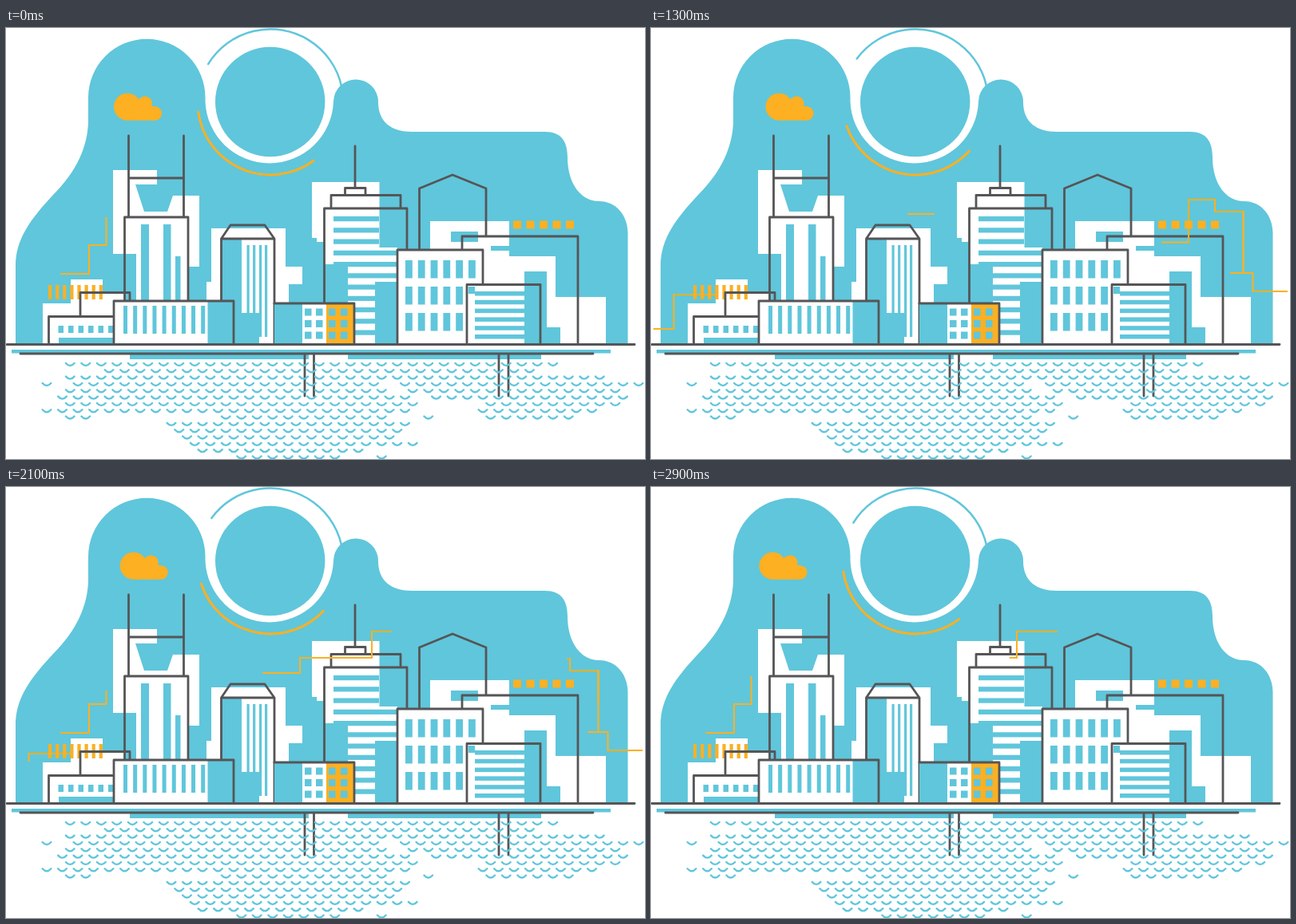
An HTML page with a canvas that plays this animation: 800x540 px, repeating every 3000 ms.

```html
<!DOCTYPE html>
<html lang="en">
<head>
<meta charset="utf-8">
<title>City skyline</title>
<style>
html, body { margin: 0; width: 800px; height: 540px; overflow: hidden; background: #fff; }
canvas { display: block; }
</style>
</head>
<body>
<canvas id="stage" width="800" height="540"></canvas>
<script>
const LOOP = 3000, STEP = 100;
const BLUE = '#60c6db', DARK = '#555557', ORANGE = '#fcb022', WHITE = '#fff';

const view = document.getElementById('stage').getContext('2d');
const backdrop = document.createElement('canvas');
backdrop.width = 800;
backdrop.height = 540;
const city = backdrop.getContext('2d');

const fill = (g, color, d) => { g.fillStyle = color; g.fill(new Path2D(d)); };
const rect = (color, x, y, right, bottom) => {
  city.fillStyle = color;
  city.fillRect(x, y, right - x, bottom - y);
};
const row = (color, count, x, pitch, width, y, bottom) => {
  for (let i = 0; i < count; i++) rect(color, x + i * pitch, y, x + i * pitch + width, bottom);
};
const line = d => {
  city.strokeStyle = DARK;
  city.lineWidth = 2.8;
  city.lineJoin = city.lineCap = 'round';
  city.stroke(new Path2D(d));
};
const disc = (g, color, x, y, r) => {
  g.fillStyle = color;
  g.beginPath();
  g.arc(x, y, r, 0, 2 * Math.PI);
  g.fill();
};

function drawSky() {
  fill(city, BLUE, `M12 396V298C12 265 30 240 60 208C88 180 103 148 103 115V87A73 73 0 0 1 249.5 87
    V92A80.3 80.3 0 0 0 410 92A28 28 0 0 1 466 93C466 118 483 130 508 130H675C695 130 703 142 703 162
    C703 195 720 217 742 217C765 217 778.5 236 778.5 257V396Z`);
  disc(city, BLUE, 330.7, 92.5, 68.7);
}

function drawLeftSide() {
  fill(city, WHITE, 'M134 178H189V196H162L173 230H202L209 210H242V299H228V342H163V283H134Z');
  fill(city, WHITE, 'M46 345H81V315H121V331H148V361H135V396H46Z');
  row(ORANGE, 8, 53, 9.1, 4.2, 322, 340);

  rect(BLUE, 169, 246, 179, 342);
  rect(BLUE, 197, 246, 206.5, 342);
  rect(BLUE, 212, 286, 218.5, 342);
  line('M153.5 135V237M222.5 135V237M153.5 188H222.5M148.5 342V237H228V342');

  row(BLUE, 6, 65.5, 12.5, 6.5, 373, 382);
  rect(BLUE, 66, 388, 135, 396);
  line('M53.5 396V361.5H135M93 361V331.5H155V342');

  fill(city, WHITE, 'M257 251H350V299H371V321H354V345H336V396H251V318H257Z');
  rect(BLUE, 269, 264, 295, 396);
  rect(BLUE, 285, 357, 317, 396);
  row(BLUE, 2, 301.5, 7.6, 3.2, 272, 357);
  row(BLUE, 2, 317, 7, 3.2, 272, 387);
  line('M269.5 342V264L281 247H324L336 264V345M269.5 264H336');

  rect(WHITE, 135, 342, 252.5, 396);
  rect(BLUE, 252.5, 342, 285, 396);
  row(BLUE, 9, 147, 12.15, 5, 348, 383);
  line('M135 396V342H285V396M336 345V396');
}

function drawCenter() {
  fill(city, WHITE, 'M383 193H467.5V275H490V318H462V396H428V296H398V268H389V263H383Z');
  for (let i = 0; i < 11; i++) {
    const y = 236 + i * 14.25;
    rect(BLUE, i < 5 ? 410 : 428, y, i < 3 ? 467 : i < 6 ? 490 : 462, y + 6.2);
  }
  line('M437 148V200M424.5 209V200.5H450V209M407 226V209.5H494V226M398.5 345V226H502V278');

  rect(BLUE, 336, 345, 371, 396);
  rect(WHITE, 371, 345, 401, 396);
  rect(ORANGE, 401, 345, 436, 396);
  for (const y of [351.5, 366, 380.5]) {
    row(BLUE, 2, 374, 14, 8.5, y, y + 9);
    row(BLUE, 2, 404, 15, 8.5, y, y + 9);
  }
  line('M336 345H436V396');
}

function drawRightSide() {
  fill(city, WHITE, `M531 242H630V286H688V337H751V396H694V375H677V305H649V321H597V278H531Z`);
  rect(BLUE, 557, 255, 591, 268);
  rect(BLUE, 607, 273, 630, 279);
  row(ORANGE, 5, 635, 16.5, 10, 241.5, 251.5);

  rect(WHITE, 490, 278, 597, 396);
  for (const y of [291, 324, 357]) row(BLUE, 6, 500, 15.8, 8.8, y, y + 22.5);
  line('M517.5 278V201L559 184L601 201V261M571 278V261H716V396M490 396V278H597V321');

  rect(WHITE, 577, 321, 649, 396);
  rect(BLUE, 649, 321, 669, 396);
  rect(BLUE, 579, 324, 587, 333);
  for (let i = 0; i < 6; i++) rect(BLUE, 587, 330 + i * 10.8, 649, 335.5 + i * 10.8);
  line('M577 396V321.5H669V396');
}

function drawShore() {
  rect(BLUE, 7, 403, 757, 407.5);
  rect(BLUE, 155, 408, 379, 415);
  rect(BLUE, 428, 408, 670, 415);
  line('M1 396.5H787M18 408H735M374 408V461M385.5 408V461M617 408V461M629 408V461');
}

// Each row lists left/right limits of its runs of ripples.
function drawWater() {
  const runs = [
    [75, 692], [123, 665], [75, 750], [45, 60, 80, 465, 488, 800], [75, 480, 505, 765],
    [65, 500, 525, 780], [75, 520, 600, 765], [45, 505, 590, 752], [75, 108, 270, 475, 520, 538, 600, 716],
    [200, 510], [216, 495], [220, 485], [230, 520], [240, 455], [289, 412, 462, 480]
  ];
  const pitch = 19.5;
  city.strokeStyle = BLUE;
  city.lineWidth = 2.4;
  city.lineCap = 'round';
  city.beginPath();
  runs.forEach((limits, k) => {
    const y = 420 + k * 8.32;
    for (let x = 51 + (k % 2 ? 0 : pitch / 2); x < 800; x += pitch) {
      const inside = limits.some((left, i) => i % 2 === 0 && x >= left && x <= limits[i + 1]);
      if (!inside) continue;
      city.moveTo(x - 5.3, y);
      city.quadraticCurveTo(x, y + 6, x + 5.3, y);
    }
  });
  city.stroke();
}

// Trails are drawn during "grow" and erased from their start during "shrink".
const trails = [
  { points: [68, 308, 104, 308, 104, 272, 125.5, 272, 125.5, 237], grow: [1345, 2345], shrink: [166, 1205] },
  { points: [3, 377, 28.5, 377, 28.5, 334, 84, 334], grow: [400, 860], shrink: [1830, 2390] },
  { points: [639, 268.5, 673, 268.5, 673, 215, 706, 215, 706, 230, 741.5, 230, 741.5, 307],
    grow: [410, 1280], shrink: [1830, 2390] },
  { points: [741.5, 307, 741.5, 230], grow: [410, 1280], shrink: [1830, 2390] },
  { points: [725, 307, 753.5, 307, 753.5, 330, 797, 330], grow: [410, 1280], shrink: [2000, 2900] },
  { points: [321, 233, 368, 233, 368, 214, 458, 214, 458, 181, 509, 181], grow: [937, 2420], shrink: [2380, 3290] }
];
for (const trail of trails) {
  const p = trail.points;
  trail.path = new Path2D();
  trail.length = 0;
  trail.path.moveTo(p[0], p[1]);
  for (let i = 2; i < p.length; i += 2) {
    trail.path.lineTo(p[i], p[i + 1]);
    trail.length += Math.hypot(p[i] - p[i - 2], p[i + 1] - p[i - 1]);
  }
}

const ease = (t, [from, to]) => {
  const u = Math.min(1, Math.max(0, (t - from) / (to - from)));
  return (1 - Math.cos(Math.PI * u)) / 2;
};

function drawTrail({ path, length, grow, shrink }, t) {
  const wraps = shrink[0] < grow[0];
  const start = wraps && t >= grow[0] ? 0 : ease(t, shrink);
  const end = wraps && t < grow[0] ? 1 : ease(t, grow);
  if (end - start < 0.001) return;
  view.setLineDash([(end - start) * length, length * 2]);
  view.lineDashOffset = -start * length;
  view.stroke(path);
  view.setLineDash([]);
}

function drawArc(color, width, from, to) {
  view.strokeStyle = color;
  view.lineWidth = width;
  view.beginPath();
  view.arc(331, 92.7, 91.2, from * Math.PI / 180, to * Math.PI / 180);
  view.stroke();
}

function drawCloud(dx) {
  disc(view, ORANGE, 151.7 + dx, 98.7, 17);
  disc(view, ORANGE, 173.5 + dx, 94.7, 9.3);
  disc(view, ORANGE, 186 + dx, 107, 8.8);
  view.fillRect(151.7 + dx, 98, 34.3, 17.8);
}

function draw(t) {
  const sway = (1 - Math.cos(2 * Math.PI * (t - 150) / LOOP)) / 2;
  view.drawImage(backdrop, 0, 0);
  view.lineCap = 'round';
  drawArc(BLUE, 2.5, 211.3 + 6 * sway, 348 + 6 * sway);
  drawArc(ORANGE, 3, 54 - 13.5 * sway, 172.5 - 13.5 * sway);
  drawCloud(10 * sway);
  view.strokeStyle = ORANGE;
  view.lineWidth = 2;
  view.lineCap = 'butt';
  for (const trail of trails) drawTrail(trail, t);
}

rect(WHITE, 0, 0, 800, 540);
drawSky();
drawLeftSide();
drawCenter();
drawRightSide();
drawShore();
drawWater();

const begin = performance.now();
function tick() {
  const t = (performance.now() - begin) % LOOP;
  draw(Math.floor(t / STEP) * STEP);
  requestAnimationFrame(tick);
}
tick();
</script>
</body>
</html>
```
